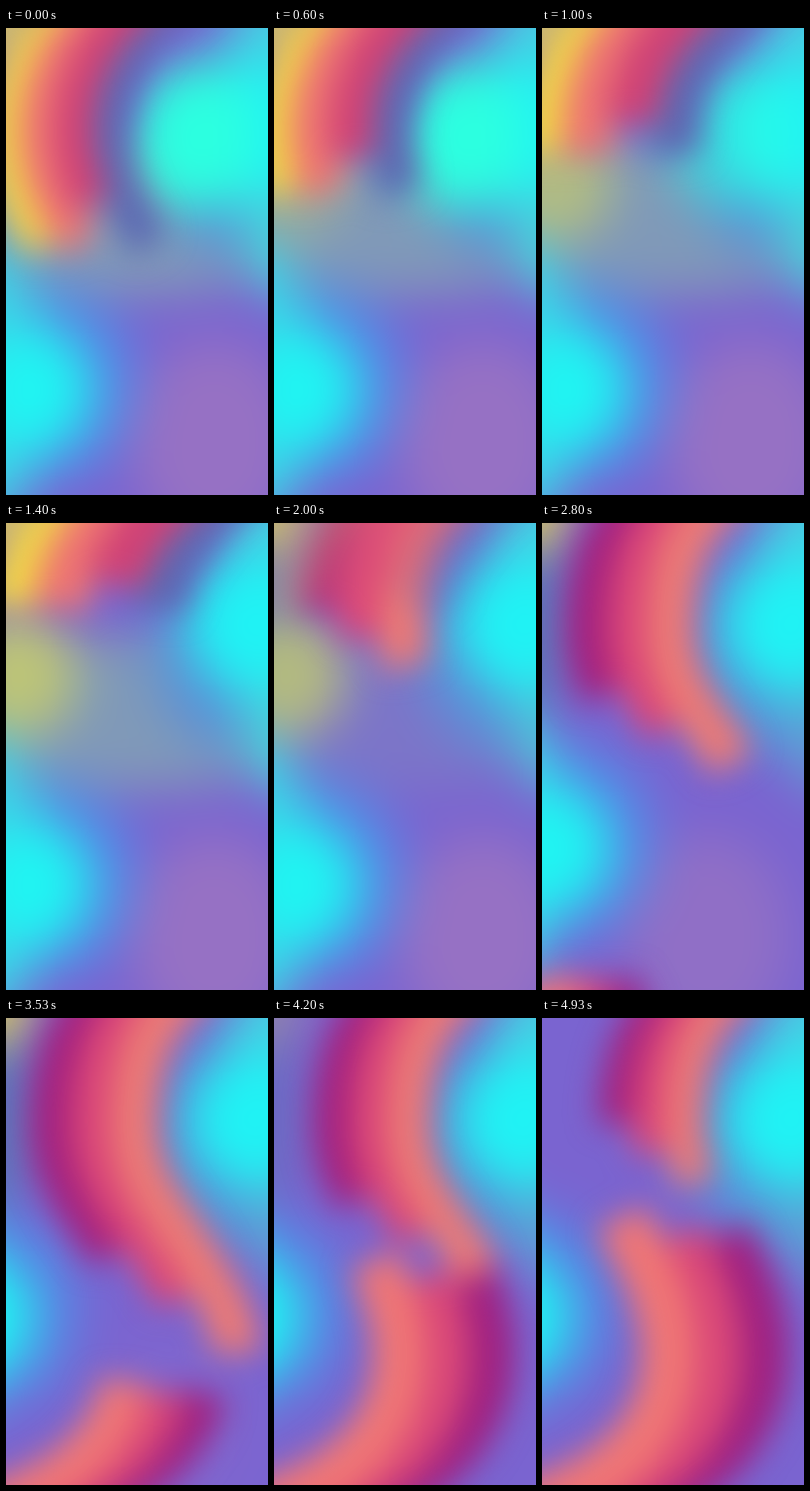
Write an HTML page that moves like this. It is 270 px wide and 480 px high and loops after 4.99 s.

```html
<!DOCTYPE html>
<html lang="en">
<head>
<meta charset="utf-8">
<title>Flowing gradient</title>
<style>
  html, body { margin: 0; width: 100%; height: 100%; overflow: hidden; background: #7a64d0; }
  svg { display: block; width: 100%; height: 100%; }
</style>
</head>
<body>
<svg viewBox="0 0 270 480" preserveAspectRatio="none">
  <defs>
    <filter id="wide" filterUnits="userSpaceOnUse" x="-100" y="-100" width="470" height="680"
            color-interpolation-filters="sRGB">
      <feGaussianBlur stdDeviation="25"/>
    </filter>
    <filter id="soft" filterUnits="userSpaceOnUse" x="-100" y="-100" width="470" height="680"
            color-interpolation-filters="sRGB">
      <feGaussianBlur stdDeviation="16"/>
    </filter>
  </defs>
  <g id="backdrop" filter="url(#wide)">
    <rect x="-100" y="-100" width="470" height="680" fill="#7a64d0"/>
  </g>
  <g id="bends" filter="url(#soft)"></g>
</svg>
<script>
const LOOP = 4990, STEPS = 75;
const updates = [];

const ramp = (t, from, to) => Math.min(1, Math.max(0, (t - from) / (to - from)));
const fadeOut = (from, to) => t => 1 - ramp(t, from, to);
const always = () => 1;
const still = () => [0, 0];

function add(parent, tag, attrs) {
  const node = document.createElementNS('http://www.w3.org/2000/svg', tag);
  for (const name in attrs) node.setAttribute(name, attrs[name]);
  return document.getElementById(parent).appendChild(node);
}

function blob(fill, cx, cy, rx, ry, opacity = always, drift = still) {
  const node = add('backdrop', 'ellipse', { fill, cx, cy, rx, ry });
  updates.push(t => {
    node.setAttribute('opacity', opacity(t));
    node.setAttribute('transform', `translate(${drift(t)})`);
  });
}

// Parallel stripes along one path. Each stripe is [colour, side, length];
// pose gives the drawn share of the path, the gap between stripes, shift and opacity.
function bend(d, stripes, pose) {
  for (const [stroke, side, length] of stripes) {
    const node = add('bends', 'path', { d, stroke, fill: 'none', pathLength: 1 });
    updates.push(t => {
      const { reach, gap, shift, opacity } = pose(t);
      node.setAttribute('stroke-dasharray', `${reach * length} 2`);
      node.setAttribute('stroke-width', gap * 1.15);
      node.setAttribute('transform', `translate(${shift + side * gap} 0)`);
      node.setAttribute('opacity', opacity);
    });
  }
}

// Lower part of the backdrop
blob('#9671c4', 215, 425, 85, 105, fadeOut(2600, 3700), t => [-45 * ramp(t, 2000, 2800), 0]);
blob('#8099b8', 135, 195, 190, 80, fadeOut(1400, 2300));
const leave = t => [-60 * ramp(t, 2500, 3500), -65 * ramp(t, 2100, 3300)];
blob('#5488e6', 35, 365, 100, 105, always, leave);
blob('#3ed2e6', -20, 365, 60, 150, always, leave);
blob('#20f4f2', 28, 372, 60, 65, always, leave);

// Cool light on the right
blob('#5a90d8', 235, 125, 85, 110);
blob('#48d0dc', 290, 130, 55, 150, t => 1 - .5 * ramp(t, 1600, 2600));
blob('#44d0e4', 290, 20, 65, 70);
blob('#20f2f4', 255, 105, 68, 70);
blob('#2cffe0', 195, 112, 66, 76, fadeOut(700, 1350));

// Left edge
blob('#5f74ba', -15, 90, 50, 110, t => ramp(t, 1500, 2200) - ramp(t, 3600, 4800));
blob('#bcc478', 12, 155, 62, 65, t => ramp(t, 100, 1200) - ramp(t, 1900, 2700));
blob('#d8c860', -15, -15, 45, 45, fadeOut(3500, 4500));

// Upper bend, growing down
bend('M168 -50C100 0 90 55 90 110C90 165 125 200 150 240C172 275 195 310 195 345',
  [['#a3207e', -1, .75], ['#da4678', 0, .87], ['#ec7a74', 1, 1]],
  t => {
    const turn = ramp(t, 3600, 4930);
    return {
      reach: ramp(t, 470, 3530) - .45 * turn,
      gap: 42 - 8 * turn,
      shift: 22 * turn,
      opacity: ramp(t, 1300, 1900)
    };
  });

// Upper bend, drawing back
bend('M165 -50C95 0 70 55 70 105C70 160 95 200 130 245',
  [['#5c68b2', 1, 1], ['#f0d448', -2, 1], ['#ee7472', -1, 1], ['#d04276', 0, .85]],
  t => {
    const away = ramp(t, 300, 1400);
    return {
      reach: .92 - .42 * ramp(t, 0, 1400),
      gap: 36 + 14 * away,
      shift: 35 * away,
      opacity: 1 - ramp(t, 1400, 2200)
    };
  });

// Lower bend, rising
bend('M0 510C110 490 178 430 178 345C178 290 150 245 130 205',
  [['#a02080', 1, .95], ['#da4878', 0, .95], ['#f07674', -1, 1]],
  t => {
    const rise = ramp(t, 2300, 4450);
    return {
      reach: rise,
      gap: 34 + 14 * rise,
      shift: -25 * (1 - rise),
      opacity: ramp(t, 2300, 2800)
    };
  });

const start = performance.now();
let shown = -1;
function tick() {
  const step = Math.floor((performance.now() - start) % LOOP / LOOP * STEPS);
  if (step !== shown) updates.forEach(update => update(step * LOOP / STEPS));
  shown = step;
  requestAnimationFrame(tick);
}
tick();
</script>
</body>
</html>
```
